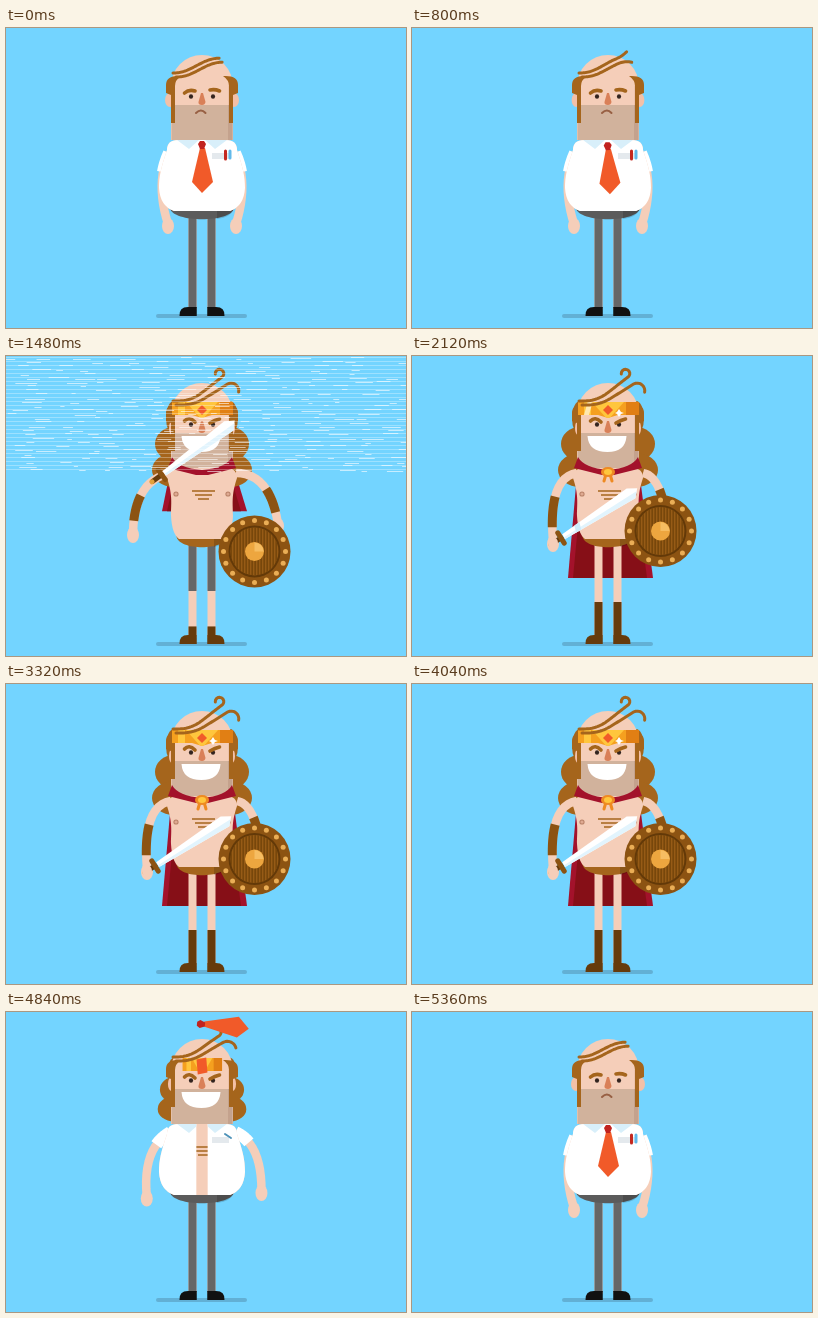
An HTML page with a canvas that plays this animation: 400x300 px, repeating every 6000 ms.

```html
<!DOCTYPE html>
<html lang="en">
<head>
<meta charset="utf-8">
<style>
html, body { margin: 0; width: 100%; height: 100%; overflow: hidden; background: #73d4ff; }
canvas { display: block; }
</style>
</head>
<body>
<canvas id="stage" width="400" height="300"></canvas>
<script>
const ctx = document.getElementById('stage').getContext('2d');
const SKIN = '#f5ceb9', HAIR = '#a5651c', LEATHER = '#8c5312', BOOT = '#663b0c', GREY = '#666',
  RED = '#a3122b', ORANGE = '#f15a29', GOLD = '#f5a01f', YELLOW = '#ffc63d', BEARD = '#d1b29c', MID = 196;

const mix = (a, b, u) => a + (b - a) * u;
const mixAll = (a, b, u) => a.map((v, i) => mix(v, b[i], u));
const smooth = u => u * u * (3 - 2 * u);
const overshoot = u => 1 + 2.7 * (u - 1) ** 3 + 1.7 * (u - 1) ** 2;
const clamp = u => Math.max(0, Math.min(1, u));
// Rises from a to b, falls from c to d
const pulse = (t, a, b, c, d, ease = smooth) => ease(clamp(Math.min((t - a) / (b - a), (d - t) / (d - c))));

function fill(path, color) { ctx.fillStyle = color; ctx.fill(new Path2D(path)); }
function line(path, color, width, cap = 'round') {
  ctx.strokeStyle = color; ctx.lineWidth = width; ctx.lineCap = cap; ctx.lineJoin = 'round';
  ctx.stroke(new Path2D(path));
}
function rect(x, y, w, h, color) { ctx.fillStyle = color; ctx.fillRect(x, y, w, h); }
function oval(x, y, rx, ry, color) {
  ctx.fillStyle = color; ctx.beginPath(); ctx.ellipse(x, y, rx, ry, 0, 0, 7); ctx.fill();
}
function group(x, y, degrees, draw, sx = 1, sy = sx) {
  ctx.save(); ctx.translate(x, y); ctx.rotate(degrees * Math.PI / 180); ctx.scale(sx, sy);
  draw(); ctx.restore();
}
function clipped(path, draw) { ctx.save(); ctx.clip(new Path2D(path)); draw(); ctx.restore(); }
function bothSides(draw) { draw(); group(2 * MID, 0, 0, draw, -1, 1); }

function armPart([x0, y0, x1, y1, x2, y2], from, to, color, width) {
  let path = '';
  for (let i = 0; i <= 12; i++) {
    const u = mix(from, to, i / 12);
    path += (i ? 'L' : 'M') + mix(mix(x0, x1, u), mix(x1, x2, u), u) + ' ' + mix(mix(y0, y1, u), mix(y1, y2, u), u);
  }
  line(path, color, width, 'butt');
}
function arm(pose, bracer, dressed) {
  armPart(pose, 0, 1, SKIN, 8.5);
  oval(pose[4], pose[5] + 2, 6, 8, SKIN);
  if (bracer) armPart(pose, .73 - .17 * bracer, .74 + .14 * bracer, LEATHER, 9);
  if (dressed) armPart(pose, 0, .3, '#fff', 12);
}

function legs(t) {
  const cloth = mix(280, 190, pulse(t, 1320, 1640, 4360, 4760));
  const boot = mix(279, 246, pulse(t, 1400, 1640, 4240, 4560));
  const color = boot < 279 ? BOOT : '#111';
  bothSides(() => {
    rect(182.5, 184, 8, 98, SKIN);
    rect(182.5, 184, 8, cloth - 184, GREY);
    rect(182.5, boot, 8, 288 - boot, color);
    fill('M190.500 279V288H173.500Q173 279 182 279Z', color);
  });
}

function torso(t, dressed) {
  const slim = pulse(t, 1240, 1440, 4240, 4560), w = mix(43, 31, slim), base = mix(28, 23, slim);
  const l = MID - w, r = MID + w;
  const shape = `M161 122Q161 112 172 112H220Q231 112 231 122C${r - 2} 140 ${r} 148 ${r} 160` +
    `Q${r - 1} 178 ${MID + base} 183H${MID - base}Q${l + 1} 178 ${l} 160C${l} 148 ${l + 2} 140 161 122Z`;
  group(MID, 180, 0, () => {
    fill('M-32 0C-30 15 30 15 32 0Z', dressed ? '#5b5b5b' : HAIR);
    fill('M15 2H31Q29 9 15 11Z', 'rgba(0,0,0,.16)');
  }, mix(1, .8, slim), 1);
  fill(shape, SKIN);
  line('M186 135H209M189 139H206M192 143H203', HAIR, 1.6, 'butt');
  bothSides(() => { oval(170, 138, 2.6, 2.6, '#b98268'); oval(170, 138, 1.6, 1.6, '#dfaa92'); });

  const gap = 45 * pulse(t, 1130, 1440, 4560, 4920);
  clipped(`M140 100H${MID - gap}V200H140ZM${MID + gap} 100H252V200H${MID + gap}Z`, () => {
    fill(shape, '#fff');
    bothSides(() => fill('M171 112H193L183 121Z', '#d8effa'));
    rect(206, 125, 17, 6, '#e4e9ed');
    if (t < 960 || t > 5080) {
      line('M219.500 123V131', '#c5281f', 3);
      line('M224 123V130', '#62b9ea', 3);
    } else line('M219 122L225 126', '#4e92b8', 2);
  });
}

function tie(t) {
  const loose = pulse(t, 720, 1160, 4960, 5240), gone = pulse(t, 1160, 1360, 4720, 5000);
  group(MID - 5 * loose, 113 + 14 * loose - 190 * gone, -30 * loose - 90 * gone, () => {
    fill('M-2 7H3L11 41L0 52L-10 41Z', ORANGE);
    fill('M-2 0H2L4 3L2 8H-2L-4 3Z', '#c1231f');
  });
}

function cape(t) {
  const bottom = mix(112, 222, pulse(t, 1360, 1640, 4120, 4640));
  if (bottom < 115) return;
  fill(`M166 106H226L241 ${bottom}H156Z`, RED);
  fill(`M172 106H220L235 ${bottom}H161Z`, '#860f17');
}
function collar(t) {
  if (t < 1440 || t > 4480) return;
  bothSides(() => fill('M166 101Q172 112 196 114V119H190L162 112Z', RED));
  if (t < 1560) return;
  line('M194 118L192 125M198 118L200 125', '#ee8a22', 3);
  oval(196, 116, 7, 5, '#ee8a22');
  oval(196, 116, 4, 3, YELLOW);
}

function backHair(h) {
  bothSides(() => group(168, 48, 0, () =>
    [8, 19, 22].forEach((width, i) => oval(0, 14 + 26 * i, width, 17, HAIR)), h));
}

// A walk whose heading bends up over the scalp and, when loose, winds into a curl
function strand(x, y, h, slope, curl) {
  let path = `M${x} ${y}`;
  const steps = 40, length = mix(49, 74, h) / steps;
  for (let i = 0; i < steps; i++) {
    const s = i / steps;
    const combed = -28 * Math.sin(Math.PI * s);
    const wild = -slope * smooth(clamp(s * 2.2)) + curl * Math.max(0, s - .75) * 4;
    const heading = mix(combed, wild, h) * Math.PI / 180;
    path += `L${x += length * Math.cos(heading)} ${y += length * Math.sin(heading)}`;
  }
  line(path, HAIR, 3);
}

function crown(t, gleam) {
  const width = pulse(t, 920, 1080, 4760, 4960), royal = pulse(t, 1080, 1360, 4600, 4880);
  const band = `M-30 -8H31V5H10L0 ${5 + 3 * royal}L-10 5H-30Z`;
  group(MID, 54, 0, () => {
    fill(band, GOLD);
    clipped(band, () => {
      rect(18, -8, 13, 16, '#e17f14');
      rect(-24, -8, 7, 16, YELLOW);
      fill('M-16 -8H16L0 10Z', YELLOW);
      if (gleam > 0 && gleam < 1) fill(`M${gleam * 66 - 34} -9h5l-5 18h-5z`, 'rgba(255,255,255,.6)');
    });
    group(0, 0, 40 * (1 - royal), () => fill('M0 -5L5 0L0 5L-5 0Z', ORANGE), mix(2.2, 1, royal));
    if (t > 1600 && t < 4500) fill('M11 -1L13 2L16 3L13 4L11 7L9 4L7 3L9 2Z', '#fff');
  }, width, 1);
}

function head(t, h, gleam) {
  const mood = pulse(t, 800, 1000, 4880, 5120);
  bothSides(() => oval(164 + 2 * h, 72, 5 - 2 * h, 7, '#f3c0a7'));
  fill('M165 112V58A31 31 0 0 1 227 58V112Z', SKIN);
  rect(222, 58, 5, 19, 'rgba(160,90,60,.1)');
  rect(165.5, 77, 61, 35, BEARD);
  rect(222, 77, 4.5, 35, '#c4a28d');
  bothSides(() => fill('M175 48Q160 47 160 57V65L165 67V95H169V58Q169 52 175 48Z', HAIR));
  crown(t, gleam);
  strand(167, 45, h, 38, -250);
  strand(170, 49, h, 32, 140);
  bothSides(() => oval(185, 68.5, 2.1, 2.3, '#33241f'));
  line(`M178.500 65Q183 ${61 - mood} 189 ${63 + 3 * mood}M204 ${62 + 5 * mood}Q209 ${61 + 3 * mood} 213.500 63`, HAIR, 3.6);
  fill('M195 65H197L199.500 74Q199 77 196 77Q192 77 192.500 74Z', '#d98058');
  if (mood < .4) line('M190 85Q195 80 199.500 85', '#986044', 2);
  else group(195.5, 80, 0, () => fill('M-20 0H19Q18 16 0 16Q-19 16 -20 0Z', '#fff'), mood);
}

function shield(t) {
  const y = mix(-40, 175, pulse(t, 1200, 1640, 4200, 4720, overshoot));
  group(248.5, y, 0, () => {
    oval(0, 0, 36, 36, LEATHER);
    oval(0, 0, 26, 26, '#633908');
    clipped('M-24 0A24 24 0 0 1 24 0A24 24 0 0 1 -24 0Z', () => {
      rect(-25, -25, 50, 50, '#965b16');
      for (let x = -24; x < 25; x += 3) rect(x, -25, 1.3, 50, '#704209');
    });
    for (let i = 0; i < 16; i++) {
      const a = i * Math.PI / 8;
      oval(31 * Math.cos(a), 31 * Math.sin(a), 2.5, 2.5, '#eaae56');
    }
    oval(0, 0, 9.5, 9.5, '#eda63f');
    fill('M0 0V-9A9 9 0 0 1 9 0Z', '#f6bd62');
  });
}

function sword(t, gleam) {
  const drop = pulse(t, 1180, 1640, 4300, 4720);
  const blade = 'M3 -2.500L82 -6.500L91 -1L84 6.500L3 3Z';
  group(mix(173, 149, drop), mix(-45, 182, drop), mix(-45, -32.5, drop), () => {
    line('M-11 0H0', BOOT, 5);
    oval(-12, 0, 2.5, 2.5, '#e3a13b');
    line('M0 -6V6', LEATHER, 5);
    fill(blade, '#fff');
    clipped(blade, () => {
      rect(3, 1, 90, 8, '#e2f4fd');
      if (gleam > 0 && gleam < 1) fill(`M${gleam * 92} -8h6l-5 16h-6z`, '#cdecfb');
    });
  });
}

// Broken white scan lines across the sky
function flash(t) {
  if (t < 1440 || t >= 1560) return;
  let seed = 7;
  const random = () => (seed = seed * 16807 % 2147483647) / 2147483647;
  for (let y = 1; y < 114; y += 4) {
    rect(0, y, 400, 1, 'rgba(255,255,255,.3)');
    for (let x = random() * 30; x < 400; x += 20 + random() * 50)
      rect(x, y + Math.floor(random() * 3), 4 + random() * 18, 1, 'rgba(255,255,255,.6)');
  }
}

// Shoulder, elbow and wrist of each arm
const REST = [163, 125, 149, 155, 162, 196], OPEN = [165, 117, 128, 124, 127, 177],
  GUARD = [165, 117, 136, 121, 141, 186], OPEN_RIGHT = [230, 117, 264, 117, 272, 168],
  GUARD_RIGHT = [231, 117, 249, 120, 255, 165];
const REST_RIGHT = REST.map((v, i) => i % 2 ? v : 2 * MID - v);

function draw(t) {
  const hair = pulse(t, 720, 1040, 4720, 5080), bracer = pulse(t, 960, 1520, 4600, 4840);
  const spread = pulse(t, 900, 1480, 4600, 5160), guard = pulse(t, 1480, 1640, 4200, 4560);
  const left = mixAll(mixAll(REST, OPEN, spread), GUARD, guard);
  const right = mixAll(mixAll(REST_RIGHT, OPEN_RIGHT, spread), GUARD_RIGHT, guard);
  const dressed = t < 1340 || t > 4680;
  const gleam = t < 3000 ? (t - 1960) / 760 : (t - 3320) / 600;

  rect(0, 0, 400, 300, '#73d4ff');
  line('M152 288H239', '#62b0d5', 4);
  cape(t);
  backHair(hair);
  legs(t);
  arm(left, bracer, dressed);
  arm(right, bracer, dressed);
  torso(t, dressed);
  head(t, hair, gleam);
  tie(t);
  collar(t);
  sword(t, gleam);
  if (guard > .5) oval(left[4], left[5] + 1, 5, 6, SKIN);
  shield(t);
  flash(t);
}

function loop() {
  draw(Math.floor(performance.now() % 6000 / 40) * 40);
  requestAnimationFrame(loop);
}
loop();
</script>
</body>
</html>
```
